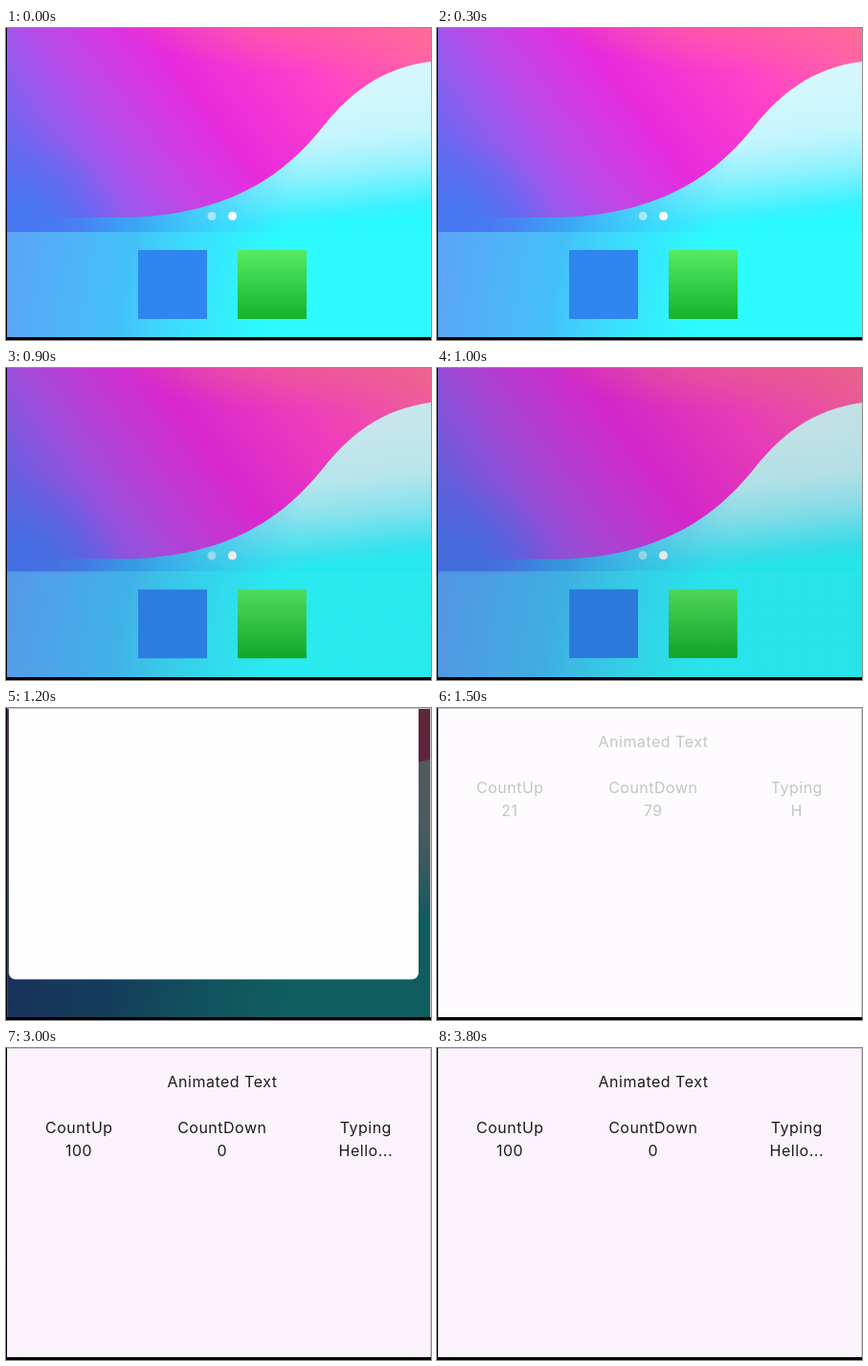
An HTML page for the animation above (3900 ms loop, 444x326 px).

```html
<!DOCTYPE html>
<html lang="en">
<head>
<meta charset="utf-8">
<title>Animated Text</title>
<style>
  html, body { margin: 0; width: 100%; height: 100%; overflow: hidden; background: #000; }
  svg { display: block; width: 444px; height: 326px; }
  text { font: 400 16px Inter, Roboto, sans-serif; letter-spacing: .5px; fill: #1d1b20; text-anchor: middle; }
</style>
</head>
<body>
<svg viewBox="0 0 444 326">
  <defs>
    <clipPath id="screen"><rect x="1.3" width="443" height="323"/></clipPath>
    <linearGradient id="pink" gradientUnits="userSpaceOnUse" x1="20" y1="235" x2="400" y2="-50">
      <stop offset=".02" stop-color="#4f74f2"/>
      <stop offset=".137" stop-color="#7066f0"/>
      <stop offset=".263" stop-color="#a455ec"/>
      <stop offset=".32" stop-color="#b84ae8"/>
      <stop offset=".43" stop-color="#d638e2"/>
      <stop offset=".515" stop-color="#e82adc"/>
      <stop offset=".74" stop-color="#ff42c8"/>
      <stop offset="1" stop-color="#ff6a9c"/>
    </linearGradient>
    <radialGradient id="corner" gradientUnits="userSpaceOnUse" cx="20" cy="215" r="105">
      <stop offset="0" stop-color="#4678f2"/>
      <stop offset=".3" stop-color="#4a76f2" stop-opacity=".9"/>
      <stop offset="1" stop-color="#5a6cf2" stop-opacity="0"/>
    </radialGradient>
    <radialGradient id="glow">
      <stop offset="0" stop-color="#ff6a90" stop-opacity=".75"/>
      <stop offset="1" stop-color="#ff6a90" stop-opacity="0"/>
    </radialGradient>
    <linearGradient id="ice" gradientUnits="userSpaceOnUse" x1="335" y1="70" x2="350" y2="205">
      <stop offset="0" stop-color="#d4f6fd"/>
      <stop offset=".35" stop-color="#c4f5fd"/>
      <stop offset=".6" stop-color="#94f2fe"/>
      <stop offset=".9" stop-color="#3cf2ff"/>
      <stop offset="1" stop-color="#28faff"/>
    </linearGradient>
    <linearGradient id="blue" gradientUnits="userSpaceOnUse" x1="0" y1="200" x2="290" y2="255">
      <stop offset="0" stop-color="#4680f2"/>
      <stop offset=".45" stop-color="#369cf2" stop-opacity=".9"/>
      <stop offset="1" stop-color="#38c8fa" stop-opacity="0"/>
    </linearGradient>
    <linearGradient id="bar">
      <stop offset="0" stop-color="#80dcff"/>
      <stop offset=".6" stop-color="#34fcff"/>
    </linearGradient>
    <linearGradient id="green" x1="0" y1="0" x2="0" y2="1">
      <stop offset="0" stop-color="#56ea62"/>
      <stop offset="1" stop-color="#14b32c"/>
    </linearGradient>
  </defs>
  <rect width="444" height="326"/>
  <g clip-path="url(#screen)">
    <g id="wall">
      <rect width="444" height="326" fill="url(#ice)"/>
      <rect width="444" height="326" fill="url(#blue)"/>
      <path fill="url(#pink)" d="M0 -60H444V35C390 42 358 70 332 102C296 147 240 197 120 198H0Z"/>
      <ellipse cx="310" cy="-15" rx="200" ry="60" fill="url(#glow)"/>
      <rect width="160" height="213" fill="url(#corner)"/>
    </g>
    <g id="dock">
      <rect y="213" width="444" height="120" fill="url(#bar)" opacity=".38"/>
      <circle cx="215" cy="196.5" r="4.5" fill="#fff" opacity=".5"/>
      <circle cx="236.5" cy="196.5" r="4.5" fill="#fff"/>
      <rect x="138" y="232" width="72" height="72" fill="#2f86ee"/>
      <rect x="242" y="232" width="72" height="72" fill="url(#green)"/>
    </g>
    <rect id="dim" width="444" height="326"/>
    <g id="app">
      <rect id="win" y="-900" fill="#fefefe"/>
      <g id="page">
        <rect width="444" height="326" fill="#faf3fb"/>
        <text x="226" y="41">Animated Text</text>
        <text x="76.3" y="89">CountUp</text>
        <text x="225.8" y="89">CountDown</text>
        <text x="375.8" y="89">Typing</text>
        <text id="up" x="76" y="113"></text>
        <text id="down" x="225.8" y="113"></text>
        <text id="typed" x="375.8" y="113"></text>
      </g>
      <path d="M0 .5H443.5V324" fill="none" stroke="#c9c5cb"/>
    </g>
  </g>
</svg>
<script>
const LOOP = 3900, STEP = 100, WORD = 'Hello...';
const $ = id => document.getElementById(id);
const set = (id, attrs) => {
  for (const k in attrs) $(id).setAttribute(k, attrs[k]);
};
const ramp = (t, a, b) => Math.min(1, Math.max(0, (t - a) / (b - a)));
const mix = (a, b, p) => a + (b - a) * p;
// scale about the middle of the phone, which lies above the stage
const zoom = k => `translate(222 -154) scale(${k}) translate(-222 154)`;

function draw(t) {
  // launching: the window grows out of its icon while the home screen dims
  const press = ramp(t, 600, 1000);
  const open = 1 - Math.pow(1 - ramp(t, 1000, 1300), 3);
  set('wall', { transform: zoom(1 + .006 * press + .077 * open) });
  set('dock', { transform: zoom(1 - .002 * press), opacity: 1 - ramp(open, 0, .9) });
  set('dim', { opacity: .09 * press + .56 * open });

  const left = mix(52, 1, open), right = mix(93, 444, open), bottom = mix(-757, 323.5, open);
  set('win', { x: left, width: right - left, height: Math.max(0, bottom + 900), rx: open < 1 ? 7 : 0 });
  set('app', { opacity: open > 0 ? 1 : 0 });

  // the page fades in over the launch screen, its counters already running
  set('page', { opacity: ramp(t, 1400, 1800) });
  const p = ramp(t, 1290, 2290);
  const n = Math.round(100 * p);
  $('up').textContent = n;
  $('down').textContent = 100 - n;
  $('typed').textContent = WORD.slice(0, Math.floor(WORD.length * p));
}

const start = performance.now();
function tick() {
  const t = (performance.now() - start) % LOOP;
  draw(Math.floor(t / STEP) * STEP);
  requestAnimationFrame(tick);
}
draw(0);
requestAnimationFrame(tick);
</script>
</body>
</html>
```
